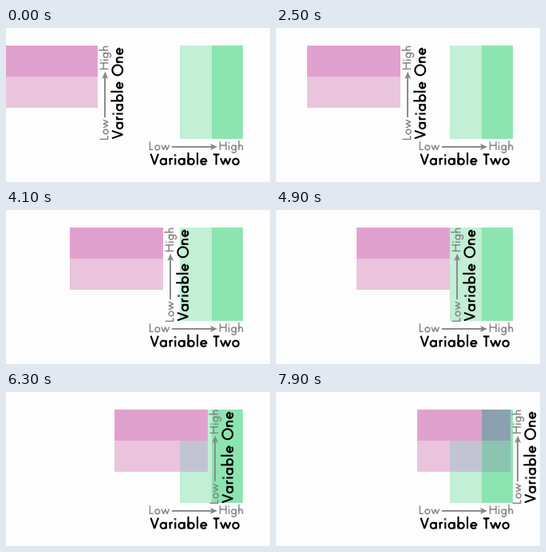
A matplotlib script that plays this animation: 331x193 px, repeating every 8000 ms.

```python
import math

import matplotlib.pyplot as plt
import numpy as np
from matplotlib.animation import FuncAnimation
from matplotlib.patches import PathPatch, Polygon, Rectangle
from matplotlib.path import Path
from matplotlib.transforms import Affine2D

W, H, DPI = 331, 193, 64
PX = 72 / DPI                      # points per pixel
FRAMES, STEP_MS, HOLD = 80, 100, 9

BACK, INK, GREY = "#fdfdfd", "#000000", "#878787"
PINK, PINK_LIGHT = "#e1a1cf", "#eac4dd"
GREEN, GREEN_LIGHT = "#8ce4b1", "#c2efd5"
SLATE, LAVENDER, SAGE = "#8ca0b0", "#c2c4d3", "#8cc4b1"

fig = plt.figure(figsize=(W / DPI, H / DPI), dpi=DPI, facecolor=BACK)
ax = fig.add_axes([0, 0, 1, 1])
ax.set_xlim(0, W)
ax.set_ylim(H, 0)
ax.axis("off")


# Geometric sans letters as centre lines, in em units above the baseline.
def arc(cx, cy, r, start=0, end=360):
    t = np.radians(np.linspace(start, end, 48))
    return list(zip(cx + r * np.cos(t), cy + r * np.sin(t)))


def stem(x, top, bottom=0):
    return [(x, top), (x, bottom)]


def arch(top):
    return [stem(0.1, top), arc(0.255, 0.265, 0.155, 180, 0) + [(0.41, 0)]]


BOWL, MID, X_TOP, ASC, CAP = 0.195, 0.215, 0.445, 0.83, 0.74

GLYPHS = {
    " ": (0.27, []),
    "a": (0.571, [arc(0.27, MID, BOWL), stem(0.465, X_TOP)]),
    "b": (0.571, [arc(0.30, MID, BOWL), stem(0.105, ASC)]),
    "e": (0.541, [[(0.465, MID), (0.075, MID)], arc(0.27, MID, BOWL, 0, 322)]),
    "g": (0.571, [arc(0.27, MID, BOWL),
                  [(0.465, X_TOP)] + arc(0.27, -0.04, BOWL, 0, -160)]),
    "h": (0.513, arch(ASC)),
    "i": (0.22, [stem(0.11, X_TOP), arc(0.11, 0.65, 0.02)]),
    "l": (0.22, [stem(0.11, ASC)]),
    "n": (0.513, arch(X_TOP)),
    "o": (0.562, [arc(0.281, MID, 0.2)]),
    "r": (0.306, [stem(0.1, X_TOP), arc(0.215, 0.295, 0.115, 180, 55)]),
    "w": (0.733, [[(0.03, X_TOP), (0.21, 0.02), (0.366, 0.43),
                   (0.52, 0.02), (0.70, X_TOP)]]),
    "H": (0.72, [stem(0.1, CAP), stem(0.62, CAP), [(0.1, 0.41), (0.62, 0.41)]]),
    "L": (0.43, [stem(0.1, CAP), [(0.1, 0.043), (0.40, 0.043)]]),
    "O": (0.80, [arc(0.40, 0.37, 0.345)]),
    "T": (0.433, [[(0.01, 0.70), (0.423, 0.70)], stem(0.2165, 0.70)]),
    "V": (0.566, [[(0.03, CAP), (0.283, 0.02), (0.536, CAP)]]),
}


def text(words, s, d, size, track, weight, color, place):
    """Stroke a line of text starting s along and d below the axis origin."""
    points, codes = [], []
    for ch in words:
        advance, strokes = GLYPHS[ch]
        for line in strokes:
            points += [place(s + x * size, d - y * size) for x, y in line]
            codes += [Path.MOVETO] + [Path.LINETO] * (len(line) - 1)
        s += advance * size + track
    return ax.add_patch(PathPatch(Path(points, codes), fill=False, ec=color,
                                  lw=weight * PX, capstyle="butt",
                                  joinstyle="bevel", zorder=5))


def axis_label(title, place):
    """Low -> High arrow with a title beneath; returns its artists."""
    small = dict(size=14.4, track=0.6, weight=1.5, color=GREY, place=place)
    shaft = Path([place(29, -4), place(80, -4)])
    head = [place(s, d) for s, d in
            [(86, -4), (77, -8), (79, -4), (77, 0)]]
    return [
        text("Low", 0, 0, **small),
        text("High", 88, 0, **small),
        ax.add_patch(PathPatch(shaft, fill=False, ec=GREY, lw=1.9 * PX,
                               capstyle="butt", zorder=5)),
        ax.add_patch(Polygon(head, fc=GREY, lw=0, zorder=5)),
        text(title, 2, 18.4, 18.5, 0.85, 2.1, INK, place),
    ]


def block(x, y, w, h, color, z):
    return ax.add_patch(Rectangle((x, y), w, h, fc=color, lw=0,
                                  antialiased=False, zorder=z))


TOP, SPLIT, LOW = 22, 61, 100
LEFT, WIDTH = -2, 117
COL1, COL2, COL_END = 218, 258, 297

block(COL1, TOP, COL2 - COL1, 117, GREEN_LIGHT, 1)
block(COL2, TOP, COL_END - COL2, 117, GREEN, 1)
axis_label("Variable Two", lambda s, d: (179 + s, 153 + d))

rows = [block(LEFT, TOP, WIDTH, SPLIT - TOP, PINK, 2),
        block(LEFT, SPLIT, WIDTH, LOW - SPLIT, PINK_LIGHT, 2)]
mixes = [(COL1, COL2, block(COL1, SPLIT, 0, LOW - SPLIT, LAVENDER, 3)),
         (COL2, COL_END, block(COL2, TOP, 0, SPLIT - TOP, SLATE, 3)),
         (COL2, COL_END, block(COL2, SPLIT, 0, LOW - SPLIT, SAGE, 3))]
moving = axis_label("Variable One", lambda s, d: (128.2 + d, 140.8 - s))


def draw(i):
    # 23 px every nine steps, on whole pixels
    dx = math.ceil(23 * max(0, i - HOLD) / 9)
    for row in rows:
        row.set_x(LEFT + dx)
    edge = LEFT + WIDTH + dx
    for start, end, mix in mixes:
        mix.set_width(max(0, min(edge, end) - start))
        mix.set_visible(edge > start)
    shift = Affine2D().translate(dx, 0) + ax.transData
    for part in moving:
        part.set_transform(shift)
    return rows + moving


anim = FuncAnimation(fig, draw, frames=FRAMES, interval=STEP_MS,
                     init_func=lambda: draw(0), repeat=True, repeat_delay=0)
plt.show()
```
